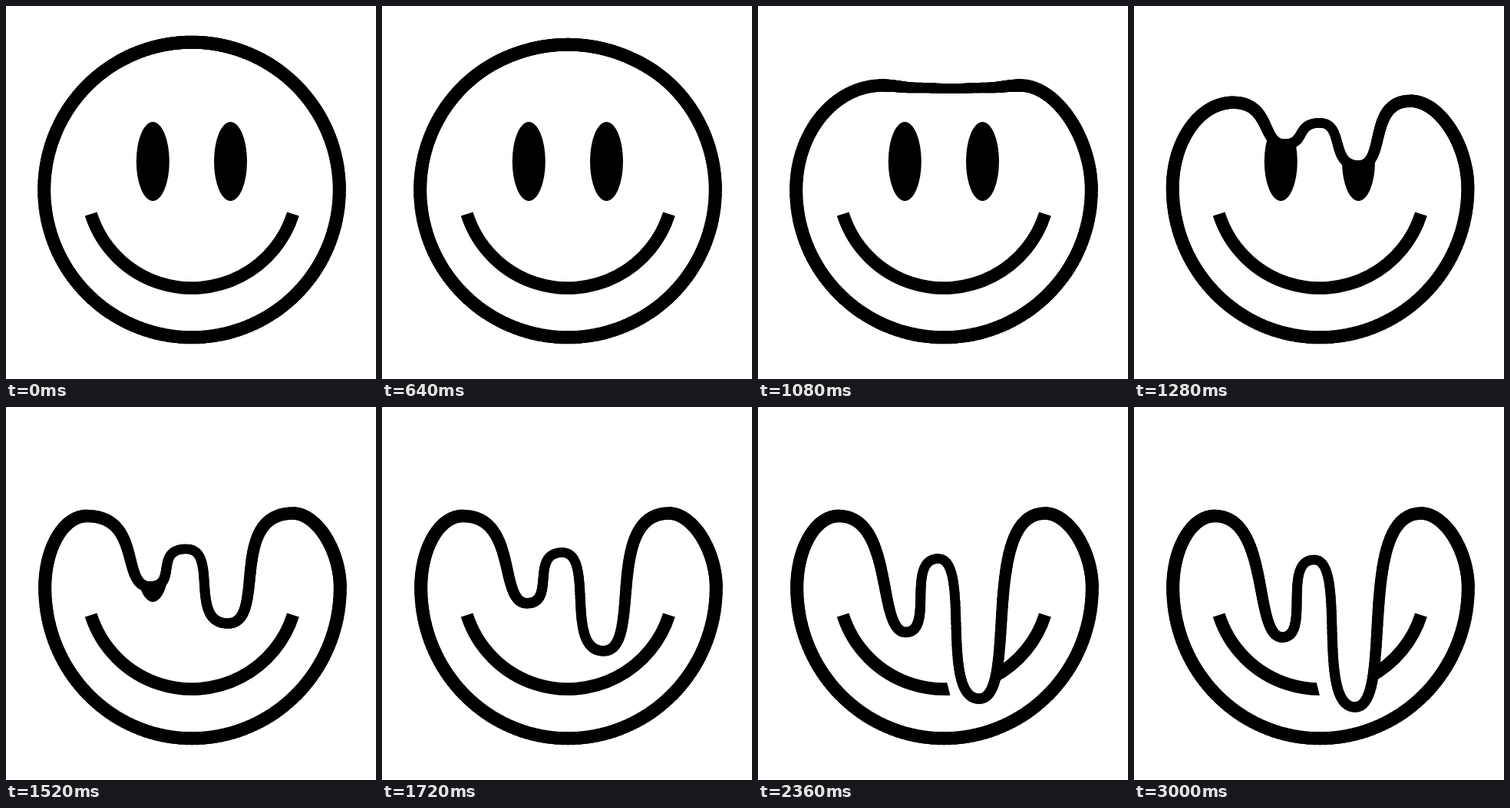
Recreate the animation shown at these times as an HTML page with a canvas. Size 482 px wide and 486 px high, loop 5000 ms.

```html
<!DOCTYPE html>
<html lang="en">
<head>
<meta charset="utf-8">
<title>Melting smile</title>
<style>
  html, body { margin: 0; width: 100%; height: 100%; overflow: hidden; background: #fff; }
  canvas { display: block; }
</style>
</head>
<body>
<canvas id="stage" width="482" height="486"></canvas>
<script>
const ctx = document.getElementById('stage').getContext('2d');
const LOOP = 5000, STEP = 40, SAG = 1080, DRIP = 1520, CUT = 2100, END = 3000;
const CX = 242, CY = 239.5, R = 192.3, LINE = 17;
const KAPPA = .5523, DETAIL = 40;

// Peaks and dips of the molten edge; reach is the length of the level tangent,
// dx and dy tell how far the point still creeps once the drips have formed.
const edge = [
  { x: 105, y: 142, reach: 73, dx: 0, dy: 0 },
  { x: 187, y: 234, reach: 38, dx: 6, dy: 66 },
  { x: 235, y: 185, reach: 43, dx: 0, dy: 14 },
  { x: 289, y: 282, reach: 52, dx: -1, dy: 109 },
  { x: 374, y: 138.5, reach: 86, dx: 0, dy: 0 }
];

const mix = (a, b, p) => a + (b - a) * p;
const clamp = p => Math.max(0, Math.min(1, p));

function edgeAt(melt, creep) {
  return edge.map((e, i) => {
    const off = i - 2;
    return {
      x: mix(CX + 10 + 45 * off, e.x + e.dx * creep, melt),
      y: mix(107.5 - off * off, e.y + e.dy * creep, melt),
      reach: mix(18, e.reach, melt),
      width: 12.5 + off * off
    };
  });
}

// Quarter oval from an upright side to a level top or bottom.
const quarter = (side, end, k = KAPPA) => [
  side,
  { x: side.x, y: mix(side.y, end.y, k) },
  { x: mix(end.x, side.x, k), y: end.y },
  end
];

const wave = (a, b) => [a, { x: a.x + a.reach, y: a.y }, { x: b.x - b.reach, y: b.y }, b];

function sample([a, b, c, d]) {
  return Array.from({ length: DETAIL }, (_, i) => {
    const t = i / DETAIL, u = 1 - t;
    const at = key => u * u * u * a[key] + 3 * u * u * t * b[key] + 3 * u * t * t * c[key] + t * t * t * d[key];
    return { x: at('x'), y: at('y'), width: mix(a.width, d.width, t) };
  });
}

function outline(t) {
  const m = clamp((t - SAG) / (DRIP - SAG));
  const melt = m * (1.5 - .5 * m);
  const creep = 1 - clamp((END - t) / (END - DRIP)) ** 2.75;
  const sag = clamp(t / SAG) ** 5.7;

  const tops = edgeAt(melt, creep);
  const side = dir => ({ x: CX + dir * R + melt, y: CY - 4 * melt, width: LINE });
  const left = side(-1), right = side(1);
  const chin = { x: CX, y: CY + R, width: LINE };
  const curves = [
    quarter(left, tops[0]),
    ...tops.slice(1).map((b, i) => wave(tops[i], b)),
    quarter(right, tops[4], .5).reverse(),
    quarter(right, chin),
    quarter(left, chin).reverse()
  ];

  // Until it has sagged, the shape is pulled out towards a circle.
  return curves.flatMap(sample).map(p => {
    const f = R / Math.hypot(p.x - CX, p.y - CY);
    return {
      x: mix(CX + (p.x - CX) * f, p.x, sag),
      y: mix(CY + (p.y - CY) * f, p.y, sag),
      width: mix(LINE, p.width, sag)
    };
  });
}

function tracePolygon(pts) {
  ctx.beginPath();
  pts.forEach(p => ctx.lineTo(p.x, p.y));
  ctx.closePath();
}

function drawEye(x) {
  ctx.beginPath();
  ctx.ellipse(x, 202.5, 21.5, 51.5, 0, 0, Math.PI * 2);
  ctx.fill();
}

function drawMouth(t) {
  const tip = .306;
  ctx.lineWidth = 16.5;
  ctx.lineCap = 'butt';
  ctx.beginPath();
  ctx.arc(CX + .3, 229.4, 138.1, tip, Math.PI - tip);
  ctx.stroke();
  if (t < CUT) return;
  // The severed left half shrinks away from the drip.
  const x = 240 + 27 * ((END - t) / (END - CUT)) ** 3.4;
  ctx.fillStyle = '#fff';
  tracePolygon([{ x: x - 5, y: 348 }, { x: x + 5, y: 388 }, { x: 300, y: 388 }, { x: 300, y: 348 }]);
  ctx.fill();
}

function strokeOutline(pts) {
  ctx.lineCap = 'round';
  pts.forEach((a, i) => {
    const b = pts[(i + 1) % pts.length];
    ctx.lineWidth = (a.width + b.width) / 2;
    ctx.beginPath();
    ctx.moveTo(a.x, a.y);
    ctx.lineTo(b.x, b.y);
    ctx.stroke();
  });
}

function draw(t) {
  const pts = outline(t);
  ctx.fillStyle = '#fff';
  ctx.fillRect(0, 0, 482, 486);
  ctx.fillStyle = ctx.strokeStyle = '#000';

  ctx.save();
  tracePolygon(pts);
  ctx.clip();
  drawEye(191.3);
  drawEye(292.5);
  drawMouth(t);
  ctx.restore();

  strokeOutline(pts);
}

const start = performance.now();
function tick() {
  const t = (performance.now() - start) % LOOP;
  draw(Math.min(END, Math.floor(t / STEP) * STEP));
  requestAnimationFrame(tick);
}
tick();
</script>
</body>
</html>
```
